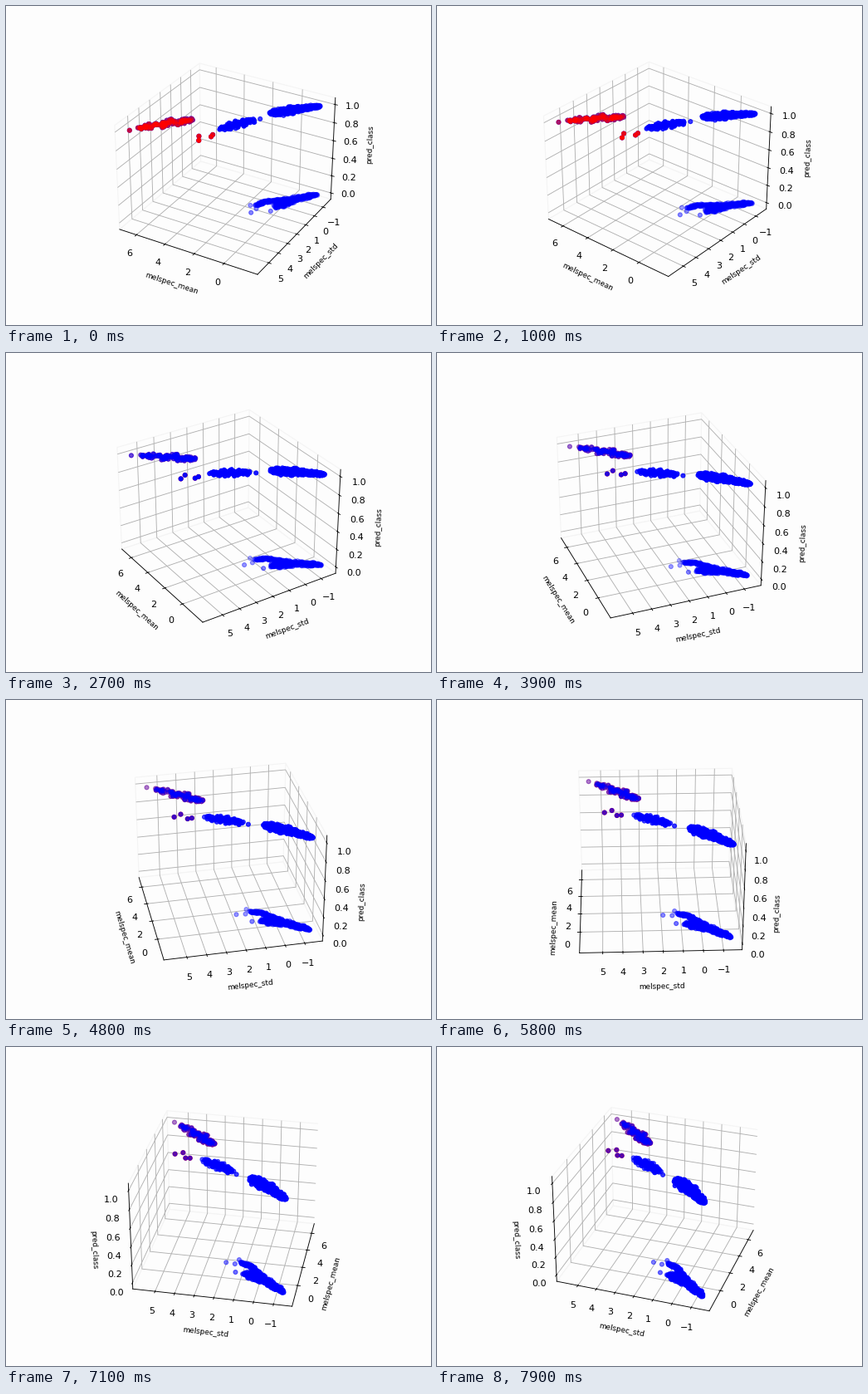
Write a matplotlib script that moves like this. It is 512x384 px and loops after 8 s.

```python
import numpy as np
import matplotlib.pyplot as plt
from matplotlib.animation import FuncAnimation

FRAMES, STEP_MS = 80, 100
ELEV, AZIM = 30, 120
RED_ON_TOP = 23          # the red layer leads until this step
PAPER, EDGE = "#fdfdfd", "#f4f4f4"
MEAN, STD = (-1.59, 6.60), (-1.41, 5.635)   # data ranges

rng = np.random.default_rng(7)


def strand(n, start, pull, end, spread, tail=0.0):
    """Scatter n (mean, std) points along a quadratic curve.

    The band is widest in its first half; tail drags points to low means.
    """
    t = rng.random((n, 1))
    curve = ((1 - t) ** 2 * np.array(start) + 2 * t * (1 - t) * np.array(pull)
             + t ** 2 * np.array(end))
    width = 0.4 + 0.6 * np.sin(np.pi * t ** 0.6)
    noise = np.clip(rng.normal(size=(n, 2)), -2, 2) * spread
    noise[:, 0] -= tail * rng.exponential(size=n)
    return np.maximum(curve + width * noise, (MEAN[0], STD[0]))


def limits(lo, hi):
    mid, half = (lo + hi) / 2, (hi - lo) / 2 * 1.1 * 25 / 24
    return mid - half, mid + half


flagged = np.vstack([
    strand(100, (4.25, 3.15), (5.2, 4.1), (6.3, 5.2), (0.2, 0.2)),
    [(6.60, 5.63), (2.80, 4.43), (2.55, 4.80), (2.17, 4.18), (2.21, 3.96)],
])
upper = np.vstack([
    strand(150, (2.25, 3.2), (1.75, 2.35), (1.1, 1.6), (0.14, 0.16), 0.16),
    strand(380, (0.4, 0.6), (-0.2, -0.35), (-1.45, -1.36), (0.24, 0.12)),
    [(0.79, 1.36)],
])
lower = np.vstack([
    strand(110, (1.1, 1.15), (0.95, 0.45), (-0.2, -0.15), (0.1, 0.06)),
    strand(380, (-0.05, 0.8), (-0.3, -0.35), (-1.5, -1.38), (0.19, 0.1)),
    [(0.98, 1.91), (0.92, 1.44), (1.42, 1.30), (0.04, 1.27)],
])
points = np.vstack([flagged, upper, lower])
level = np.r_[np.ones(len(flagged) + len(upper)), np.zeros(len(lower))]

fig = plt.figure(figsize=(6.4, 4.8), dpi=80, facecolor=PAPER)
ax = fig.add_subplot(projection="3d", computed_zorder=False, facecolor=PAPER)
blue = ax.scatter(*points.T, level, c="b", s=20, zorder=2)
red = ax.scatter(*flagged.T, np.ones(len(flagged)), c="r", s=20, zorder=3)

ax.set(xlim=limits(*MEAN), ylim=limits(*STD), zlim=limits(0, 1))
ax.set_xticks(range(0, 7, 2))
ax.set_yticks(range(-1, 6))
ax.set_xlabel("melspec_mean", fontsize=8)
ax.set_ylabel("melspec_std", fontsize=8)
ax.set_zlabel("pred_class", fontsize=8)
for axis in (ax.xaxis, ax.yaxis, ax.zaxis):
    axis.pane.set_alpha(1)
    axis.pane.set_facecolor(PAPER)
    axis.pane.set_edgecolor(EDGE)


def update(i):
    ax.view_init(elev=ELEV, azim=AZIM + i)
    red.set_zorder(3 if i < RED_ON_TOP else 1)
    return blue, red


anim = FuncAnimation(fig, update, frames=FRAMES, interval=STEP_MS,
                     repeat=True, repeat_delay=0, blit=False)
plt.show()
```
